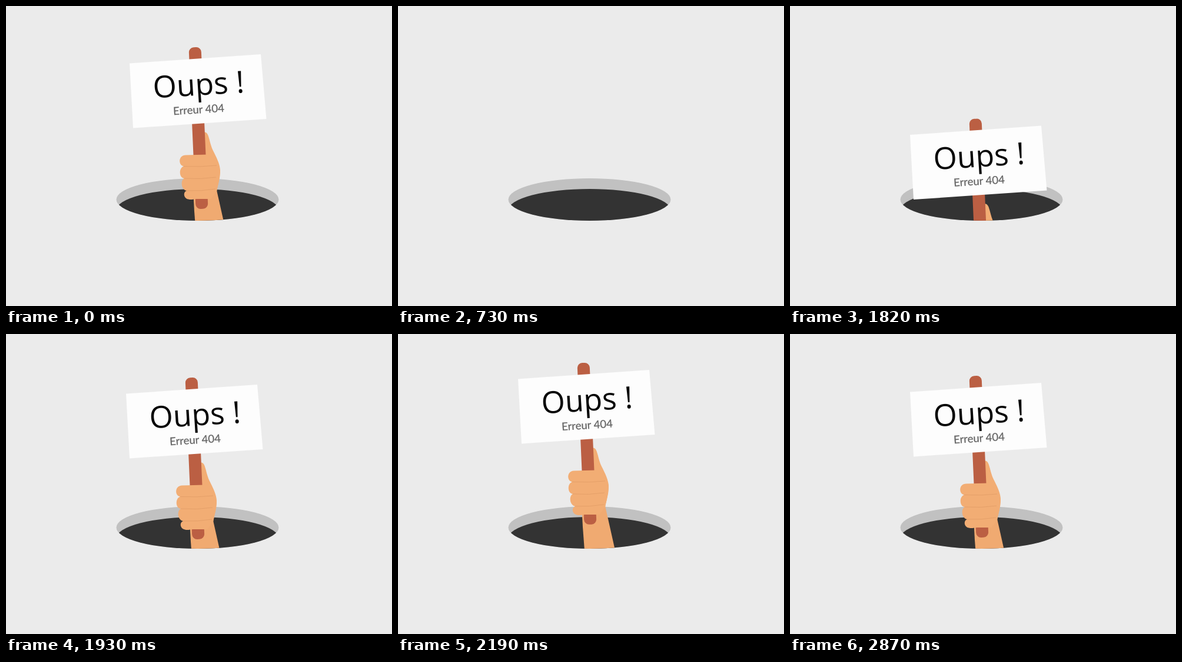
Recreate the animation shown at these times as an HTML page. Size 656 by 510 pixels, loop 2.96 s.

```html
<!DOCTYPE html>
<html lang="fr">
<head>
<meta charset="utf-8">
<title>Erreur 404</title>
<style>
  html, body { margin: 0; width: 100%; height: 100%; overflow: hidden; background: #ebebeb; }
  svg { display: block; width: 656px; height: 510px; }
  .title { font: 51.6px "Open Sans", "Noto Sans", sans-serif; fill: #050505; }
  .note { font: 18.5px Lato, "Open Sans", sans-serif; fill: #666; stroke: #666; stroke-width: .3px; }
</style>
</head>
<body>
<svg viewBox="0 0 656 510">
  <defs>
    <path id="front" d="M0 0H656V329H463.5A138 36 0 0 1 187.5 329H0Z"/>
    <clipPath id="holeClip"><ellipse cx="325.5" cy="329" rx="138" ry="36"/></clipPath>
    <clipPath id="handClip"><use href="#front"/></clipPath>
    <clipPath id="signClip"><use href="#front" y="12"/></clipPath>
  </defs>

  <g id="hole">
    <ellipse cx="325.5" cy="329" rx="138" ry="36" fill="#c1c1c1"/>
    <ellipse cx="325.5" cy="347" rx="138" ry="36" fill="#333" clip-path="url(#holeClip)"/>
  </g>

  <g id="scene">
    <g clip-path="url(#handClip)">
      <g class="move">
        <path d="M312.5 322L314 350L320 430H378L352 314Z" fill="#f0aa71"/>
        <path d="M326 218C331 214 335 215 337.500 221C341 231 342 240 347 249C352 259 357.500 270 358 280C358.500 292 355 302 352 316L334 328L322 260Z" fill="#f2ad74"/>
        <rect x="310.500" y="71" width="21" height="275" rx="8.500" fill="#bb5f43" transform="rotate(-2.500 321 208.500)"/>
      </g>
    </g>
    <g clip-path="url(#signClip)">
      <g class="move">
        <path d="M204 98.500L427 83L436.500 193L210 208.500Z" fill="#fdfdfd"/>
        <text class="title" transform="translate(244.800 157.600) rotate(-3.600)">Oups !</text>
        <text class="note" transform="translate(278.500 186.200) rotate(-3.600)">Erreur 404</text>
      </g>
    </g>
    <g clip-path="url(#handClip)">
      <g class="move">
        <path d="M338 253.500L299 254.500C286.500 255 286.500 272 296 273.500C287.500 276 287.500 293 297 294C290.500 297 291 313 301 315C294.500 317 295.500 328 304 329.500C309 331 313 329 318 329H342L352 316C355 302 358 292 357 280L348 262Z" fill="#f2ad74"/>
        <path d="M296 273.500Q325 275 352 272M297 294Q325 296 351 292M301 315Q326 316 350 312" fill="none" stroke="#e5a069"/>
      </g>
    </g>
  </g>
</svg>
<script>
const LOOP = 2960;
// [start, hold time of each step] in ms
const STEPS = [[0, 30], [30, 46], [540, 190], [730, 970], [1700, 60], [1760, 34],
  [1930, 32.5], [2190, 50], [2240, 36], [2420, 540]];
const parts = document.querySelectorAll('.move');
const hole = document.getElementById('hole');
const scene = document.getElementById('scene');

function snap(t) {
  const [start, hold] = STEPS.findLast(s => s[0] <= t);
  return start + Math.floor((t - start) / hold) * hold;
}

function offset(t) {
  if (t < 540) {
    const p = t / 490;
    return [6 - 3 * p + 4 * Math.sin(Math.PI * p), -1 - p];
  }
  if (t < 2070) return [0, -30 + 290 * ((2070 - t) / 370) ** 2.236];
  const p = Math.min(1, (t - 2070) / 350);
  return [0, -15 * (1 + Math.cos(Math.PI * p))];
}

function show(el, on) {
  el.style.display = on ? '' : 'none';
}

function draw(now) {
  const t = snap(now % LOOP);
  show(hole, t < 540 || t >= 730);
  show(scene, t < 540 || t >= 1700);
  const [x, y] = offset(t);
  for (const part of parts) part.setAttribute('transform', `translate(${x} ${y})`);
  requestAnimationFrame(draw);
}

draw(0);
</script>
</body>
</html>
```
